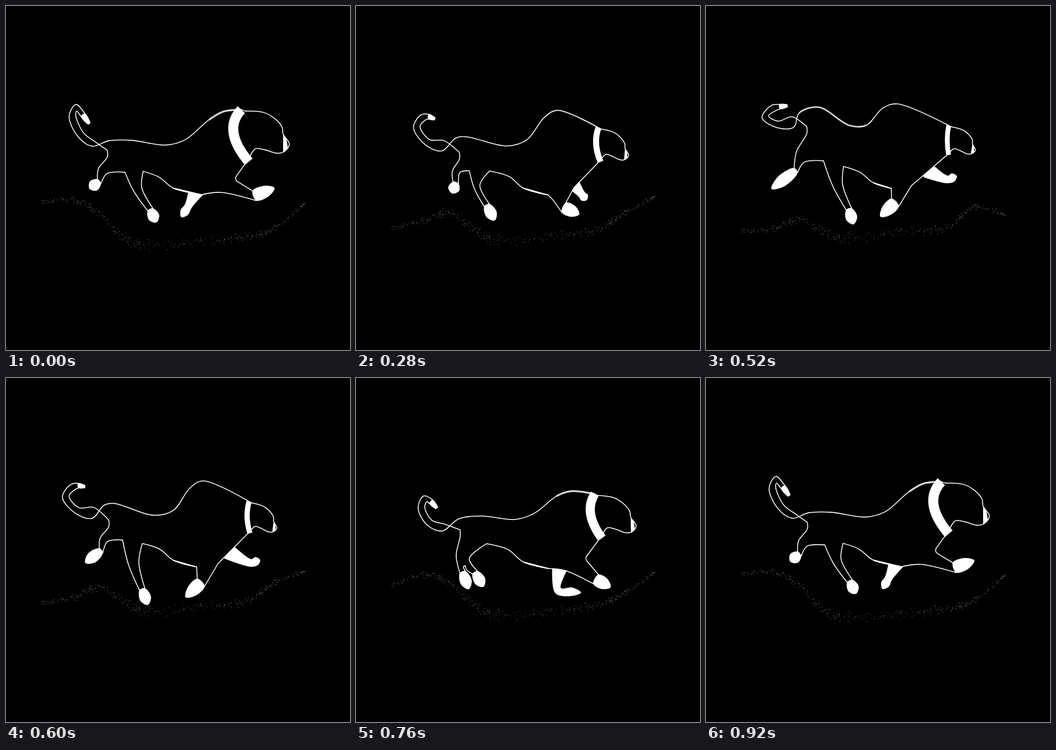
An HTML page with a canvas that plays this animation: 720 by 720 pixels, repeating every 0.96 s.

```html
<!DOCTYPE html>
<html lang="en">
<head>
<meta charset="utf-8">
<title>Running dog</title>
<style>
html, body { margin: 0; width: 100%; height: 100%; overflow: hidden; background: #000; }
canvas { display: block; width: 720px; height: 720px; }
</style>
</head>
<body>
<canvas id="stage" width="720" height="720"></canvas>
<script>
const ctx = document.getElementById('stage').getContext('2d');
const LOOP = 960, STEP = 40, MIDDLE = 460, STRIDE = 930;

// The body swings out and back: its keys are distances in ms from the middle.
const SWING = [60, 140, 300, 460];
const body = {
  tail: [
    [182,241, 150,246, 124,230, 141,212, 154,209, 170,207],
    [182,280, 149,275, 125,246, 140,226, 151,223, 165,225],
    [183,315, 154,305, 137,273, 145,255, 157,261, 169,274],
    [184,289, 157,270, 139,230, 147,213, 161,228, 174,246]],
  back: [
    [195,222, 236,210, 300,248, 335,248, 370,212, 400,203],
    [205,264, 225,260, 310,285, 350,275, 385,228, 412,213],
    [215,297, 262,291, 335,298, 375,284, 420,249, 450,239],
    [215,282, 262,281, 335,291, 375,280, 425,238, 455,221]],
  // rump, foreleg joint, belly, groin
  trunk: [
    [211,251, 388,380, 350,368, 322,346],
    [215,295, 399,393, 350,379, 322,356],
    [218,320, 404,401, 350,387, 318,361],
    [212,302, 409,395, 350,381, 320,358]],
  // x, y, matrix, collar bend, collar width, tail root width
  head: [
    [513,251, .62,-.09,.12,.55, 3, 10, 22],
    [514,259, .63,-.075,.13,.59, 5, 11, 23],
    [507,248, .85,.015,.06,.84, 16, 19, 15],
    [501,220, 1,0,0,1, 24, 21, 11]]
};
const profile = [[0,0], [39,3], [62,16], [77,34], [79,48], [92,68],
  [89,77], [79,86], [65,88], [41,81], [21,79], [8,98]];

// The legs run through one stride.
const STEPS = [0, 160, 360, 520, 600, 760];
const legs = {
  // ankle, toe
  rear: [[195,367, 175,383], [210,386, 205,413], [204,356, 188,378],
    [188,344, 137,383], [199,361, 166,387], [223,406, 236,442]],
  // crotch, knee, ankle, toe
  hind: [[249,348, 284,380, 302,426, 315,453], [246,360, 271,390, 278,438, 291,471],
    [234,333, 258,366, 277,406, 295,437], [246,324, 286,374, 299,425, 309,457],
    [244,339, 278,386, 285,442, 297,475], [229,393, 237,378, 249,407, 267,437]],
  // elbow, ankle, toe
  fore: [[477,363, 520,397, 562,381], [485,377, 500,426, 550,409], [437,380, 398,415, 412,448],
    [430,376, 396,411, 365,441], [444,388, 408,428, 376,459], [479,378, 502,421, 533,438]],
  // hip, ankle, toe
  far: [[395,393, 382,418, 367,442], [421,403, 412,437, 400,464], [470,350, 505,366, 528,368],
    [469,346, 505,363, 525,356], [471,366, 512,387, 532,381], [427,403, 423,445, 471,449]]
};

const groundX = [75, 140, 195, 245, 300, 400, 500, 560, 627];
const groundY = [
  [470, 467, 445, 471, 487, 470, 465, 420, 438],
  [470, 460, 436, 465, 490, 477, 468, 428, 404],
  [434, 412, 428, 472, 497, 487, 476, 450, 405],
  [409, 407, 432, 484, 501, 492, 483, 465, 411]];

const mod = (i, n) => (i % n + n) % n;
const clamp = v => Math.max(0, Math.min(1, v));
const mix = (a, b, u) => a + (b - a) * u;
const between = (p, q, u = .5) => [mix(p[0], q[0], u), mix(p[1], q[1], u)];
const shift = (p, d, k = 1) => [p[0] + d[0] * k, p[1] + d[1] * k];
const pairs = v => v.flatMap((x, i) => i % 2 ? [] : [[x, v[i + 1]]]);
const unit = (p, q) => {
  const l = Math.hypot(q[0] - p[0], q[1] - p[1]) || 1;
  return [(q[0] - p[0]) / l, (q[1] - p[1]) / l];
};
const normal = (p, q) => {
  const [x, y] = unit(p, q);
  return [y, -x];
};

// Smooth interpolation; key(k) gives [time, row] for any whole k
function sample(key, k, t) {
  while (key(k + 1)[0] <= t) k++;
  const [[t0, a], [t1, b], [t2, c], [t3, d]] = [-1, 0, 1, 2].map(o => key(k + o));
  const h0 = t1 - t0, h = t2 - t1, h2 = t3 - t2, u = (t - t1) / h, e = u * u * (3 - 2 * u);
  return b.map((v, j) => {
    const s0 = (v - a[j]) / h0, s1 = (c[j] - v) / h, s2 = (d[j] - c[j]) / h2;
    const m1 = (s0 * h + s1 * h0) / (h0 + h), m2 = (s1 * h2 + s2 * h) / (h + h2);
    return mix(v, c[j], e) + h * u * (1 - u) * (m1 * (1 - u) - m2 * u);
  });
}

const swing = (rows, t) => sample(k => {
  if (k < 0) return [-SWING[-1 - k], rows[-1 - k]];
  if (k > 3) return [2 * MIDDLE - SWING[6 - k], rows[6 - k]];
  return [SWING[k], rows[k]];
}, -1, Math.abs(t - MIDDLE));

const stride = (rows, t) => pairs(sample(k => {
  const i = mod(k, STEPS.length);
  return [STEPS[i] + STRIDE * Math.floor(k / STEPS.length), rows[i]];
}, 0, t));

// Bezier handle at p on the side of q, centripetal Catmull-Rom
function handle(o, p, q) {
  const a = Math.sqrt(Math.hypot(p[0] - o[0], p[1] - o[1]));
  const b = Math.sqrt(Math.hypot(q[0] - p[0], q[1] - p[1]));
  if (a < .01) return p;
  return [0, 1].map(i =>
    (a * a * q[i] - b * b * o[i] + (2 * a * a + 3 * a * b + b * b) * p[i]) / (3 * a * (a + b)));
}

function curve(p, from = 0, to = p.length - 1, closed = false) {
  const n = p.length;
  const get = i => closed ? p[mod(i, n)] : p[Math.max(0, Math.min(n - 1, i))];
  ctx.lineTo(...get(from));
  for (let i = from; i < to; i++) {
    const a = get(i), b = get(i + 1);
    ctx.bezierCurveTo(...handle(get(i - 1), a, b), ...handle(get(i + 2), b, a), ...b);
  }
}

function blob(p) {
  ctx.beginPath();
  curve(p, 0, p.length, true);
  ctx.fill();
}

// Outline from the front of the ankle round the toe to the back
function paw(ankle, toe, ankleWidth, width) {
  const n = normal(ankle, toe), pad = between(ankle, toe, .6);
  return [shift(ankle, n, ankleWidth), shift(pad, n, width), toe,
    shift(pad, n, -width), shift(ankle, n, -ankleWidth)];
}

// Seeded dust along the ground line
let seed = 7;
const rnd = () => (seed = seed * 16807 % 2147483647) / 2147483647;
const dust = Array.from({ length: 480 }, () => {
  const u = rnd();
  return {
    s: u * 8,
    off: (rnd() + rnd() - 1) * (4 + 10 * Math.sin(Math.PI * u)),
    alpha: .2 + .5 * rnd()
  };
});

function drawDust(t) {
  const y = swing(groundY, t);
  const along = (v, s) => {
    const i = Math.min(7, Math.floor(s)), u = s - i;
    const [a, b, c, d] = [-1, 0, 1, 2].map(o => v[Math.max(0, Math.min(8, i + o))]);
    return b + .5 * u * (c - a + u * (2 * a - 5 * b + 4 * c - d + u * (3 * (b - c) + d - a)));
  };
  for (const d of dust) {
    ctx.globalAlpha = d.alpha;
    ctx.fillRect(Math.round(along(groundX, d.s)), Math.round(along(y, d.s) + d.off), 1, 1);
  }
  ctx.globalAlpha = 1;
}

function drawFarLeg(t) {
  const [hip, ankle, toe] = stride(legs.far, t);
  const n = normal(hip, ankle), top = shift(hip, unit(hip, ankle), -8);
  const bend = normal(hip, toe), foot = paw(ankle, toe, 8, 9).slice(1, 4);
  ctx.beginPath();
  curve([shift(top, n, 17), shift(ankle, bend, 8), ...foot,
    shift(ankle, bend, -8), shift(top, n, -17)]);
  ctx.fill();
}

function draw(t) {
  ctx.fillStyle = '#000';
  ctx.fillRect(0, 0, 720, 720);
  ctx.fillStyle = ctx.strokeStyle = '#fff';
  ctx.lineJoin = 'round';
  drawDust(t);
  drawFarLeg(t);

  const bob = [0, 2.5 * Math.sin(2 * Math.PI * (t - MIDDLE) / MIDDLE)];
  const at = rows => pairs(swing(rows, t)).map(p => shift(p, bob));

  // Head and collar share one frame
  const [x, y, a, c, b, d, bend, band, root] = swing(body.head, t);
  const local = ([px, py]) => shift([x + a * px + c * py, y + b * px + d * py], bob);
  const face = profile.map(local);
  const nape = local([-8.5, -3]), throat = local([7, 106]), breast = local([-1, 111]);

  // Tail edges lie on both sides of its middle line
  const mid = at(body.tail), last = mid.length - 1;
  const widths = [root, 14, 14, 14, 10, 5];
  const edge = side => mid.map((p, i) =>
    shift(p, normal(mid[Math.max(0, i - 1)], mid[Math.min(last, i + 1)]), side * widths[i] / 2));
  const outer = edge(-1), inner = edge(1).reverse();

  const [rump, joint, belly, groin] = at(body.trunk);
  const [elbow, foreAnkle, foreToe] = stride(legs.fore, t);
  const [crotch, knee, hindAnkle, hindToe] = stride(legs.hind, t);
  const [rearAnkle, rearToe] = stride(legs.rear, t);
  const forePaw = paw(foreAnkle, foreToe, 11, 12);
  const hindPaw = paw(hindAnkle, hindToe, 6, 12);
  const rearPaw = paw(rearAnkle, rearToe, 6, 12);

  const top = [...inner, ...at(body.back), nape];
  const under = [joint, belly, groin, [202 + .3 * knee[0], groin[1] - 12]];
  const wrist = shift(between(forePaw[4], joint, .65), [0, -.08 * (forePaw[4][0] - joint[0])]);
  const hock = shift(between(hindPaw[4], crotch), [-5, 0]);
  const arch = [mix(crotch[0], rearAnkle[0], .7), mix(crotch[1], rearAnkle[1], .15)];
  const heel = shift(between(rearPaw[4], rump), [-8, 8]);

  ctx.beginPath();
  curve([rump, ...outer]);
  curve(top);
  curve(face);
  ctx.lineTo(...breast);
  ctx.arcTo(...elbow, ...forePaw[0], 8);
  ctx.lineTo(...forePaw[0]);
  curve([forePaw[4], wrist, joint]);
  curve(under);
  curve([under[3], knee, hindPaw[0]]);
  curve([hindPaw[4], hock, crotch]);
  curve([crotch, arch, rearPaw[0]]);
  curve([rearPaw[4], heel, shift(rump, [0, 14]), rump]);
  ctx.closePath();
  ctx.fillStyle = '#000';
  ctx.fill();
  ctx.lineWidth = 1.8;
  ctx.stroke();
  ctx.fillStyle = '#fff';

  // Soft thickening at the withers, or at the rump and dip
  const q = Math.abs(t - MIDDLE);
  const glow = (strength, from, to) => {
    ctx.globalAlpha = .55 * clamp(strength);
    ctx.lineWidth = 4.5;
    ctx.beginPath();
    curve(top, from, to);
    ctx.stroke();
  };
  glow((q - 140) / 160, 10, 12);
  glow(1 - q / 160, 6, 9);
  ctx.globalAlpha = 1;

  ctx.beginPath();
  curve(under, 0, 1);
  ctx.closePath();
  ctx.fill();
  ctx.lineWidth = 2;
  ctx.stroke();

  blob([...outer.slice(-2), ...inner.slice(0, 2)]);
  [rearPaw, hindPaw, forePaw].forEach(blob);

  ctx.beginPath();
  [face[4], between(face[4], face[5], .55), face[6], face[7]].forEach(p => ctx.lineTo(...p));
  ctx.fill();

  ctx.beginPath();
  ctx.moveTo(...nape);
  ctx.quadraticCurveTo(...shift(between(nape, throat), [-2 * bend, -bend / 2]), ...throat);
  ctx.lineWidth = band;
  ctx.stroke();
}

const start = performance.now();
function tick() {
  const t = (performance.now() - start) % LOOP;
  draw(Math.floor(t / STEP) * STEP);
  requestAnimationFrame(tick);
}
tick();
</script>
</body>
</html>
```
